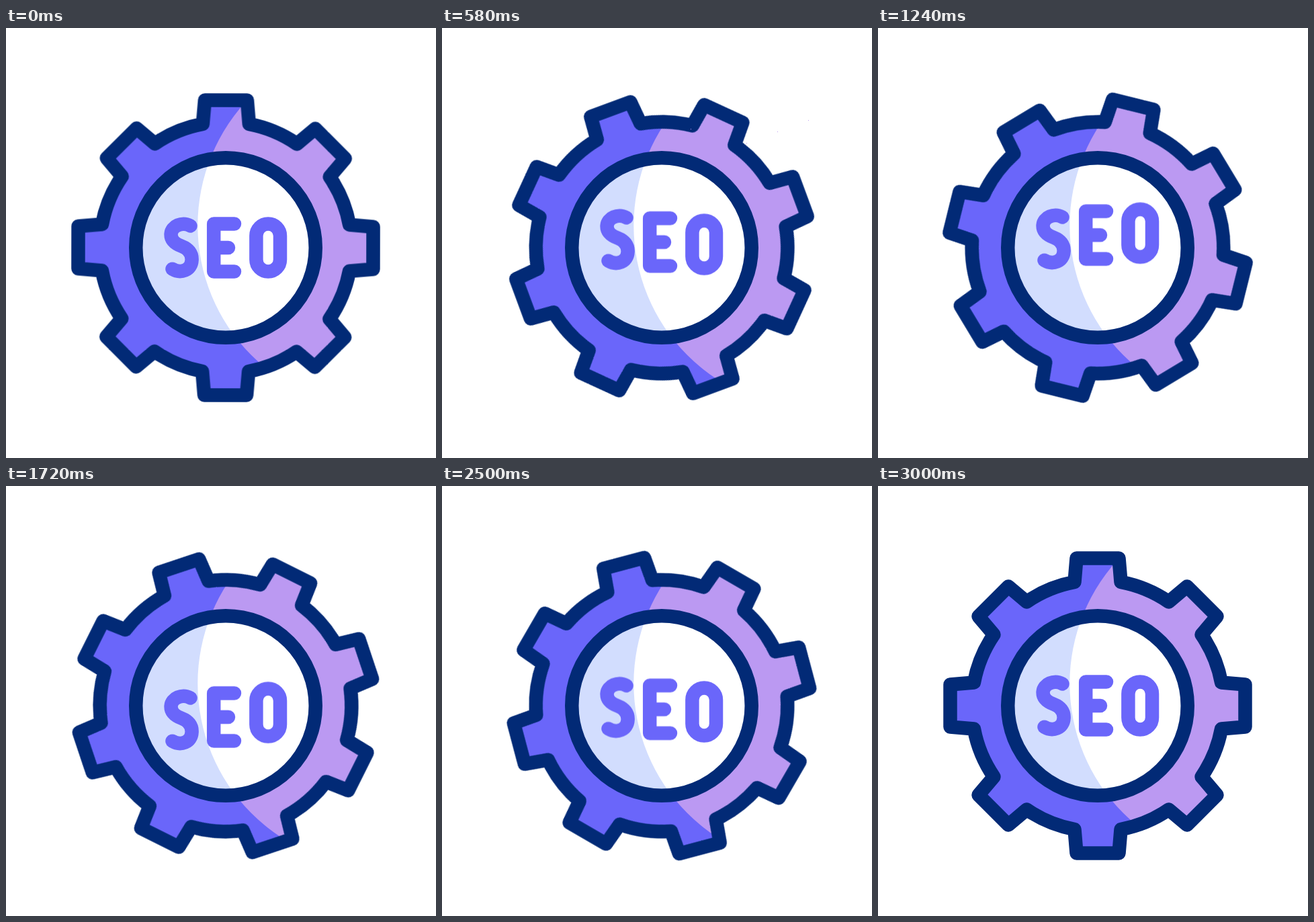
Write an HTML page that moves like this. It is 640 by 640 pixels and loops after 3.02 s.

```html
<!DOCTYPE html>
<html lang="en">
<head>
<meta charset="utf-8">
<title>SEO gear</title>
<style>
  :root {
    --navy: #022a76;
    --violet: #6a66fa;
    --lilac: #bb99f2;
    --ice: #d2ddfe;
    --loop: 3020ms;
  }
  html, body { margin: 0; width: 100%; height: 100%; overflow: hidden; background: #fff; }
  svg { display: block; width: 100vw; height: 100vh; }

  .outline { stroke: var(--navy); stroke-width: 20.5; stroke-linejoin: round; }

  #gear {
    fill: #fff;
    fill-rule: evenodd;
    transform-origin: 327px 327px;
    animation: spin var(--loop) linear infinite;
  }

  .letter {
    fill: none;
    stroke: var(--violet);
    stroke-width: 20.5;
    stroke-linecap: round;
    stroke-linejoin: round;
    animation: bob var(--loop) cubic-bezier(.37, 0, .63, 1) infinite;
  }
  .s { animation-delay: 100ms; }
  .e { animation-delay: 200ms; }
  .o { animation-delay: 300ms; }

  /* One full turn in 3000 ms, then a short rest */
  @keyframes spin {
    0% { transform: rotate(0deg); }
    99.338%, 100% { transform: rotate(360deg); }
  }
  @keyframes bob {
    0% { transform: translateY(0); }
    29.8% { transform: translateY(-22px); }
    56.29% { transform: translateY(22px); }
    86.09%, 100% { transform: translateY(0); }
  }
</style>
</head>
<body>
<svg viewBox="0 0 640 640" role="img" aria-label="SEO">
  <defs>
    <circle id="light" cx="558.3" cy="294" r="273"/>
    <clipPath id="disc"><circle cx="327" cy="327" r="133.75"/></clipPath>
  </defs>

  <!-- Still two-tone fill; the turning white surround cuts it to the gear shape -->
  <rect width="640" height="640" fill="var(--violet)"/>
  <use href="#light" fill="var(--lilac)"/>
  <path id="gear" class="outline"/>

  <circle cx="327" cy="327" r="133.75" fill="var(--ice)"/>
  <g clip-path="url(#disc)"><use href="#light" fill="#fff"/></g>
  <circle class="outline" cx="327" cy="327" r="133.75" fill="none"/>

  <path class="letter s" d="M274.5 294.5C262 288 246.5 294.5 245.6 306.5C245 317 253 321.5 262 325C271 328.5 277 335 276.6 345C276 361 260 366 247.5 358.7"/>
  <path class="letter e" d="M340 291.5H309.2V362.5H340M309.2 327H331"/>
  <rect class="letter o" x="372.4" y="291.5" width="35.6" height="71" rx="17.8"/>
</svg>
<script>
  const C = 327, RIM = 187.3, TIP = 219.5;
  const BASE_HALF = 34.5, TIP_HALF = 31.5, TEETH = 8;

  // Point at offset (x across, y outward) on a tooth turned by angle a
  const at = (a, x, y) => {
    const s = Math.sin(a), c = Math.cos(a);
    return `${(C + x * c + y * s).toFixed(2)} ${(C + x * s - y * c).toFixed(2)}`;
  };

  const baseY = Math.sqrt(RIM ** 2 - BASE_HALF ** 2);
  let gear = '';
  for (let i = 0; i < TEETH; i++) {
    const a = i * 2 * Math.PI / TEETH;
    gear += i ? `A${RIM} ${RIM} 0 0 1 ` : 'M';
    gear += at(a, -BASE_HALF, baseY);
    gear += `L${at(a, -TIP_HALF, TIP)}L${at(a, TIP_HALF, TIP)}L${at(a, BASE_HALF, baseY)}`;
  }
  gear += `A${RIM} ${RIM} 0 0 1 ${at(0, -BASE_HALF, baseY)}Z`;

  const surround = 'M-273 327A600 600 0 0 1 927 327A600 600 0 0 1 -273 327Z';
  document.getElementById('gear').setAttribute('d', surround + gear);
</script>
</body>
</html>
```
